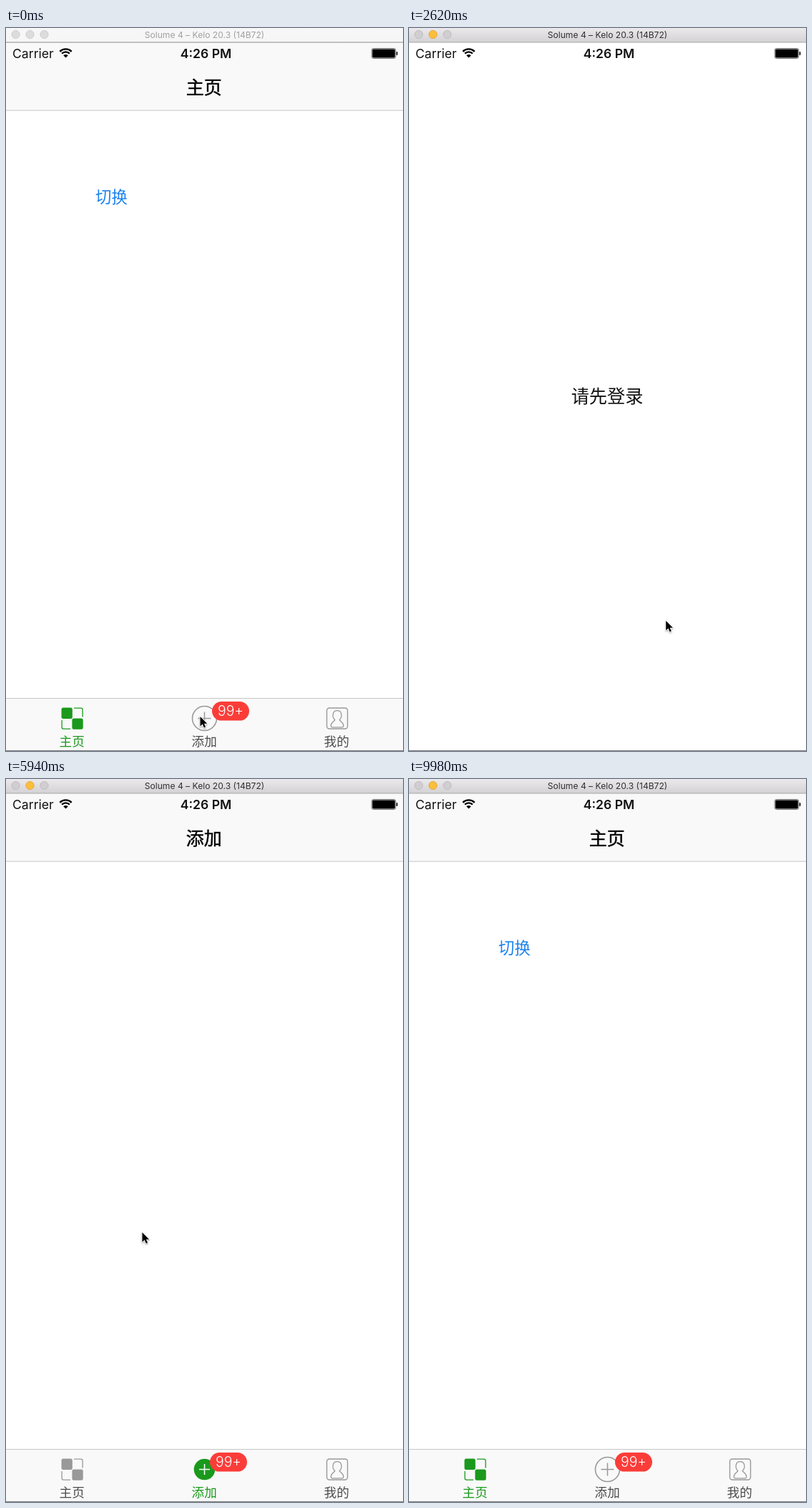
Animation, 555 px wide and 1009 px high, one loop 10 s. Source, as an HTML page with a canvas:

```html
<!DOCTYPE html>
<html lang="zh-CN">
<head>
<meta charset="utf-8">
<title>主页</title>
<style>
html, body { margin: 0; width: 100%; height: 100%; overflow: hidden; background: #fff; }
canvas { display: block; width: 555px; height: 1009px; }
</style>
</head>
<body>
<canvas id="stage"></canvas>
<script>
const W = 555, H = 1009, LOOP = 10000;
const canvas = document.getElementById('stage');
const ctx = canvas.getContext('2d');
const ratio = window.devicePixelRatio || 1;
canvas.width = W * ratio;
canvas.height = H * ratio;

const CJK = '"Noto Sans CJK SC", "Noto Sans CJK", sans-serif';
const LATIN = 'Inter, Roboto, sans-serif';
const GREEN = '#1a991c', GRAY = '#999', BLUE = '#1a82ee';
const TOP = 20, BOTTOM = 1008;

// Moments of the clicks
const ACTIVATE = 500;
const TABS = [[0, 0], [720, 1], [4300, 0], [5480, 1], [6980, 0], [8300, 1], [9480, 0]];
const PRESSES = [[5380, 6980], [8200, 9480]];
const PRESENT = 1865, DISMISS = 3075, SLIDE = 500, HIDE = 9880;

// Pointer path: time, x, y
const PATH = [
  [0, 271, 960], [900, 271, 960], [1700, 461, 968], [2060, 461, 968],
  [2760, 347, 810], [3440, 347, 810], [4150, 96, 962], [4420, 96, 962],
  [4800, 147, 848], [5330, 150, 238], [5560, 150, 238], [5940, 190, 631],
  [6700, 98, 962], [7060, 98, 962], [7260, 142, 915], [8000, 150, 240],
  [8400, 150, 240], [9150, 98, 962], [9560, 98, 962], [9980, 150, 870]
];

const clamp = v => Math.max(0, Math.min(1, v));

function bezier(t, a, b) {
  return 3 * a * t * (1 - t) ** 2 + 3 * b * t * t * (1 - t) + t ** 3;
}

function slideEase(x) {
  x = clamp(x);
  let lo = 0, hi = 1;
  for (let i = 0; i < 24; i++) {
    const mid = (lo + hi) / 2;
    if (bezier(mid, 0.38, 0.125) < x) lo = mid; else hi = mid;
  }
  return bezier((lo + hi) / 2, 0.7, 1);
}

// Velocity at a path point, zero where the pointer rests
function velocity(i, k) {
  const a = PATH[i - 1], p = PATH[i], b = PATH[i + 1];
  const same = (u, v) => u[1] === v[1] && u[2] === v[2];
  if (!a || !b || same(a, p) || same(p, b)) return 0;
  return (b[k] - a[k]) / (b[0] - a[0]);
}

function pointerAt(t) {
  let i = 0;
  while (i < PATH.length - 2 && t >= PATH[i + 1][0]) i++;
  const a = PATH[i], b = PATH[i + 1], d = b[0] - a[0];
  const u = clamp((t - a[0]) / d), v = 1 - u;
  return [1, 2].map(k =>
    (1 + 2 * u) * v * v * a[k] + u * v * v * d * velocity(i, k) +
    u * u * (3 - 2 * u) * b[k] - u * u * v * d * velocity(i + 1, k));
}

function text(str, x, y, font, color, align = 'center', bold = 0) {
  ctx.font = font;
  ctx.textAlign = align;
  ctx.textBaseline = 'alphabetic';
  ctx.fillStyle = color;
  ctx.fillText(str, x, y);
  if (bold) {
    ctx.strokeStyle = color;
    ctx.lineWidth = bold;
    ctx.strokeText(str, x, y);
  }
}

function rect(x, y, w, h, color) {
  ctx.fillStyle = color;
  ctx.fillRect(x, y, w, h);
}

function round(x, y, w, h, r, fill, stroke, width = 1) {
  ctx.beginPath();
  ctx.roundRect(x, y, w, h, r);
  paint(fill, stroke, width);
}

function disc(x, y, r, fill, stroke, width = 1) {
  ctx.beginPath();
  ctx.arc(x, y, r, 0, Math.PI * 2);
  paint(fill, stroke, width);
}

function paint(fill, stroke, width) {
  if (fill) { ctx.fillStyle = fill; ctx.fill(); }
  if (stroke) { ctx.strokeStyle = stroke; ctx.lineWidth = width; ctx.stroke(); }
}

function line(d, color, width, fill) {
  const p = new Path2D(d);
  if (fill) { ctx.fillStyle = fill; ctx.fill(p); }
  ctx.strokeStyle = color;
  ctx.lineWidth = width;
  ctx.stroke(p);
}

function titleBar(active) {
  const g = ctx.createLinearGradient(0, 0, 0, TOP);
  g.addColorStop(0, active ? '#ebe9eb' : '#f7f7f7');
  g.addColorStop(1, active ? '#d3d1d3' : '#f6f6f6');
  rect(0, 0, W, TOP, g);
  rect(0, 19.5, W, 1, active ? '#aaa8aa' : '#8c8c8c');
  [13.5, 33.5, 53.5].forEach((x, i) => {
    const lit = active && i === 1;
    disc(x, 9, 5.6, lit ? '#fdbe3c' : active ? '#d0ced0' : '#dcdcdc',
      lit ? '#dfa232' : active ? '#bab8ba' : '#cacaca', 0.9);
  });
  text('Solume 4 – Kelo 20.3 (14B72)', 277.5, 14, '12.1px ' + LATIN, active ? '#303030' : '#a0a0a0');
}

function statusBar() {
  text('Carrier', 9, 42, '17.6px ' + LATIN, '#111', 'left');
  text('4:26 PM', 279.5, 42, '600 17.6px ' + LATIN, '#111');
  ctx.strokeStyle = '#000';
  ctx.lineWidth = 2.4;
  for (const r of [11.6, 7.6]) {
    ctx.beginPath();
    ctx.arc(83.5, 41, r, -Math.PI * 0.75, -Math.PI * 0.25);
    ctx.stroke();
  }
  ctx.beginPath();
  ctx.moveTo(83.5, 41.5);
  ctx.arc(83.5, 41.5, 4.6, -Math.PI * 0.75, -Math.PI * 0.25);
  paint('#000');
  round(511.2, 28.5, 33.6, 14, 2.5, null, '#777', 1);
  round(512.2, 29.5, 31.6, 12, 1.4, '#000');
  round(545.5, 33, 2, 5, 1, '#222');
}

function homeIcon(color) {
  round(77.5, 948.6, 15.3, 15.3, 2.5, color);
  round(92.4, 963.4, 15.3, 15.3, 2.5, color);
  line('M95 949.2H104.7Q107.1 949.2 107.1 951.6V961.5M78.1 966V975.7Q78.1 978.1 80.5 978.1H90', color, 1.3);
}

function addIcon(on) {
  if (on) disc(277.5, 963.5, 14.8, GREEN);
  else disc(277.5, 963.5, 17, null, GRAY, 1.6);
  const r = on ? 7.5 : 9;
  line(`M${277.5 - r} 963.5h${2 * r}M277.5 ${963.5 - r}v${2 * r}`, on ? '#fff' : GRAY, 1.5);
}

function userIcon() {
  round(448.5, 949, 29, 29, 3.5, null, GRAY, 1.4);
  line('M459.8 965.5C455.5 961.5 456 952.6 463 952.6C470 952.6 470.5 961.5 466.2 965.5C467 968 471.8 968.5 471.8 974Q471.8 975.8 470 975.8H456Q454.2 975.8 454.2 974C454.2 968.5 459 968 459.8 965.5Z', GRAY, 1.3);
}

function tabBar(tab) {
  rect(0, 935, W, BOTTOM - 935, '#f9f9f9');
  rect(0, 935, W, 1, '#c6c6c6');
  homeIcon(tab === 0 ? GREEN : GRAY);
  addIcon(tab === 1);
  userIcon();
  ['主页', '添加', '我的'].forEach((s, i) =>
    text(s, 92.2 + 185 * i, 1002.3, '17.6px ' + CJK, i === tab ? GREEN : '#4c4c4c'));
  const x = tab === 1 ? 285 : 288;
  round(x, 940, 52, 26.6, 13.3, '#fb3d39');
  text('99+', x + 26, 960.2, '300 19.4px ' + LATIN, '#fff');
}

function buttonAlpha(t) {
  let alpha = 1;
  for (const [down, back] of PRESSES) {
    if (t >= down) alpha = t < back ? 0.2 : 0.2 + 0.8 * clamp((t - back) / 400);
  }
  return alpha;
}

function modal(t) {
  const shown = slideEase((t - PRESENT) / SLIDE) - slideEase((t - DISMISS) / SLIDE);
  if (shown <= 0.0005) return;
  const y = TOP + (1 - shown) * (BOTTOM - TOP);
  ctx.save();
  ctx.beginPath();
  ctx.rect(0, TOP, W, BOTTOM - TOP);
  ctx.clip();
  rect(0, y, W, BOTTOM - TOP, '#fff');
  text('请先登录', 277, y + 502.5, '25.2px ' + CJK, '#111');
  ctx.restore();
}

function pointer(t) {
  if (t >= HIDE) return;
  const [x, y] = pointerAt(t);
  ctx.save();
  ctx.translate(x, y);
  ctx.shadowColor = 'rgba(0,0,0,.3)';
  ctx.shadowBlur = 2 * ratio;
  ctx.shadowOffsetY = ratio;
  ctx.lineJoin = 'round';
  const arrow = 'M.5 1V14.6L3.7 11.6L5.9 16.6L8.1 15.6L6 10.8H10.2Z';
  line(arrow, '#fff', 1.8, '#fff');
  ctx.shadowColor = 'transparent';
  ctx.fillStyle = '#000';
  ctx.fill(new Path2D(arrow));
  ctx.restore();
}

function draw(t) {
  ctx.setTransform(ratio, 0, 0, ratio, 0, 0);
  const tab = TABS.filter(e => t >= e[0]).pop()[1];
  rect(0, 0, W, H, '#fff');
  rect(0, TOP, W, 95, '#f9f9f9');
  rect(0, 114.5, W, 1, '#c6c6c6');
  text(tab ? '添加' : '主页', 276.8, 91.7, '25px ' + CJK, '#000', 'center', 0.45);
  if (tab === 0) {
    ctx.globalAlpha = buttonAlpha(t);
    text('切换', 147.5, 243.5, '22.4px ' + CJK, BLUE);
    ctx.globalAlpha = 1;
  }
  tabBar(tab);
  modal(t);
  statusBar();
  titleBar(t >= ACTIVATE);
  rect(0, BOTTOM, W, 1, '#777');
  pointer(t);
}

const start = performance.now();
function tick() {
  draw((performance.now() - start) % LOOP);
  requestAnimationFrame(tick);
}
tick();
</script>
</body>
</html>
```
